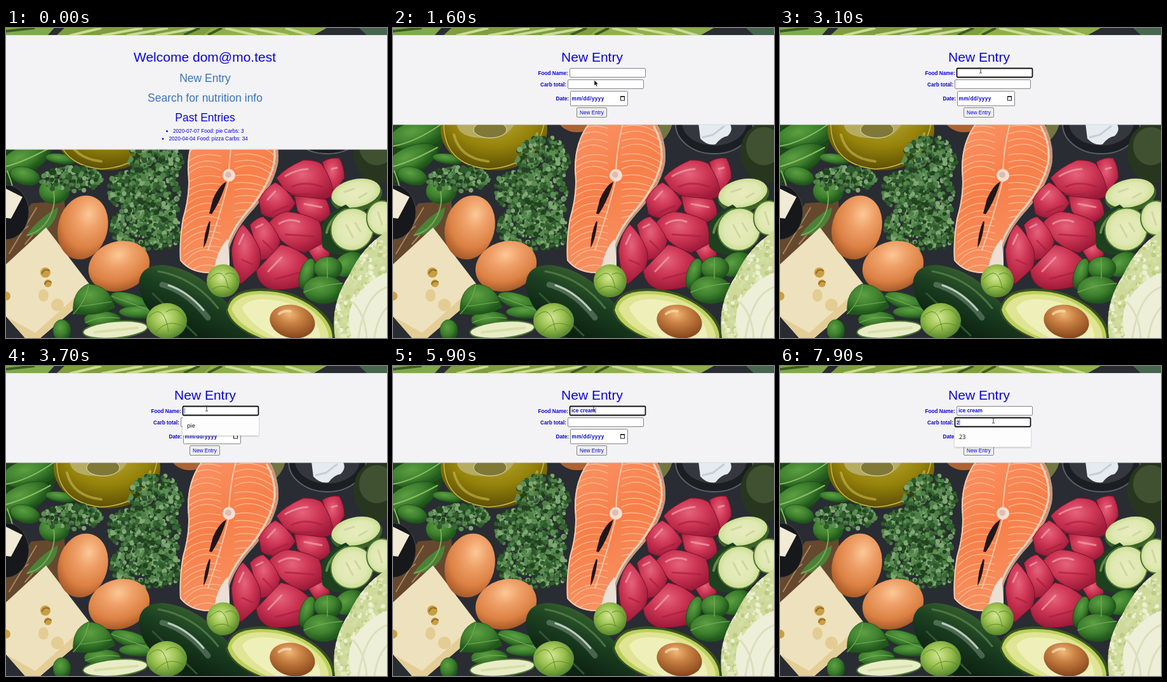
An HTML page for the animation above (8 s loop, 600x488 px).

```html
<!DOCTYPE html>
<html lang="en">
<head>
<meta charset="utf-8">
<title>Food diary</title>
<style>
html, body { margin: 0; width: 100%; height: 100%; overflow: hidden; }
svg { display: block; width: 600px; height: 488px; }
text { font: 8.2px "Liberation Sans", Arial, sans-serif; fill: #0b05d2; white-space: pre; }
.mid { text-anchor: middle; }
.h1 { font-size: 21px; }
.h2 { font-size: 17.5px; }
.link { fill: #3a74b8; }
.bold { font-weight: bold; }
.menu text { font: 500 9px "Noto Sans", sans-serif; fill: #111; }
.tip text { font: 8.6px "Noto Sans", sans-serif; fill: #fff; }
.field { fill: #fff; stroke: #858585; }
.focus { stroke: #101010; stroke-width: 1.8; }
.panel { fill: #f3f2f5; stroke: #dcdce0; }
.menu rect { fill: #fdfdfd; filter: drop-shadow(0 1px 1px #0004); }
.line { fill: none; stroke-linecap: round; }
</style>
</head>
<body>
<svg viewBox="0 0 600 488">
<defs>
  <radialGradient id="egg" cx=".55" cy=".28" r=".8"><stop stop-color="#fbc896"/><stop offset=".3" stop-color="#efa068"/><stop offset=".65" stop-color="#dc8144"/><stop offset="1" stop-color="#93481c"/></radialGradient>
  <radialGradient id="oil" cy=".3" r=".7"><stop stop-color="#c0b040"/><stop offset=".6" stop-color="#94820a"/><stop offset="1" stop-color="#5a4d06"/></radialGradient>
  <radialGradient id="leaf" cx=".4" cy=".35" r=".6"><stop stop-color="#5da043"/><stop offset=".6" stop-color="#3d7f2d"/><stop offset="1" stop-color="#20571c"/></radialGradient>
  <radialGradient id="sprout" cx=".45" cy=".4" r=".6"><stop stop-color="#d4e796"/><stop offset=".5" stop-color="#9cc250"/><stop offset="1" stop-color="#54862a"/></radialGradient>
  <radialGradient id="slice"><stop stop-color="#e9ecbf"/><stop offset=".7" stop-color="#dfe8b2"/><stop offset="1" stop-color="#cbdd92"/></radialGradient>
  <radialGradient id="pit" cx=".4" cy=".3" r=".7"><stop stop-color="#efb878"/><stop offset=".4" stop-color="#c98143"/><stop offset="1" stop-color="#89481c"/></radialGradient>
  <radialGradient id="meat" cx=".45" cy=".35" r=".65"><stop stop-color="#e5637b"/><stop offset=".5" stop-color="#cd3554"/><stop offset="1" stop-color="#9d1938"/></radialGradient>
  <linearGradient id="fish" x2=".4" y2="1"><stop stop-color="#fb9467"/><stop offset=".5" stop-color="#f77f49"/><stop offset="1" stop-color="#f89364"/></linearGradient>
  <linearGradient id="squash" x1=".3" y1=".8" x2=".7" y2=".2"><stop stop-color="#0d2312"/><stop offset=".55" stop-color="#1b3f20"/><stop offset="1" stop-color="#38622f"/></linearGradient>
  <clipPath id="cabbage"><path d="M600 320Q560 345 540 390Q510 435 518 488H600Z"/></clipPath>
  <clipPath id="steak"><path d="M308 150H416Q433 185 428 215Q420 250 390 285Q362 315 352 345L352 375Q340 385 320 386Q290 386 274 366Q272 335 278 300Q290 260 286 225Q285 180 308 150Z"/></clipPath>
</defs>

<g id="photo">
  <path d="M0 0H600V488H0Z" fill="#292c32"/>
  <!-- top edge -->
  <path d="M0 0H76L66 11H0Z" fill="#7fa94c"/>
  <path d="M92 0H322L310 11H80Z" fill="#7f9d41"/>
  <path d="M322 0H505L485 11H310Z" fill="#8fae4d"/>
  <path d="M100 12L150 0M150 12L215 0M190 12L255 0M235 12L300 0M345 0L395 12M385 0L445 12M440 0L480 12" stroke="#cadb95" stroke-width="4"/>
  <path d="M280 11L305 0M0 5L45 0M318 11L340 0" stroke="#3d5a25" stroke-width="4"/>
  <path d="M556 0H600V11H568Z" fill="#46664d"/>
  <!-- spinach, oil, third egg -->
  <path d="M0 150H95L72 195Q50 235 0 245Z" fill="#1d4519"/>
  <g fill="url(#leaf)" stroke="#1d4a18" stroke-width=".7">
    <ellipse cx="40" cy="168" rx="46" ry="22" transform="rotate(-12 40 168)"/>
    <ellipse cx="30" cy="206" rx="42" ry="20" transform="rotate(-22 30 206)"/>
    <ellipse cx="86" cy="206" rx="24" ry="8" transform="rotate(8 86 206)"/>
    <ellipse cx="30" cy="233" rx="24" ry="14" transform="rotate(15 30 233)"/>
  </g>
  <path class="line" d="M0 186Q35 180 75 152M0 218Q30 210 70 188M2 225Q8 240 12 256" stroke="#8bbb62" stroke-width="2"/>
  <ellipse cx="159" cy="160" rx="84" ry="64" fill="url(#oil)"/>
  <path class="line" d="M80 150Q80 215 150 222Q225 218 238 150" stroke="#c5b64f" stroke-width="1.5"/>
  <path class="line" d="M96 168Q105 205 150 210M205 203Q222 190 227 166" stroke="#d3c253" stroke-width="4" opacity=".55"/>
  <path d="M100 150Q102 172 140 173Q178 178 192 150Z" fill="#b5ac62"/>
  <ellipse cx="153" cy="160" rx="26" ry="13" fill="#7f7837" stroke="#dfdba9"/>
  <ellipse cx="290" cy="143" rx="30" ry="21" fill="#ad6233"/>
  <!-- bowl of salt, whole avocado -->
  <ellipse cx="506" cy="151" rx="61" ry="47" fill="#1b1e23" stroke="#5b6066" stroke-width="2"/>
  <ellipse cx="506" cy="149" rx="51" ry="36" fill="#34383e"/>
  <path d="M481 150H530Q537 160 527 170Q516 172 508 183Q495 186 484 174Z" fill="#e6ebf0"/>
  <path class="line" d="M488 172L504 168L521 155" stroke="#c5ced7" stroke-width="3"/>
  <ellipse cx="590" cy="196" rx="43" ry="48" fill="#28361f"/>
  <ellipse cx="584" cy="186" rx="28" ry="30" fill="#3f5130"/>
  <path d="M416 185Q414 165 420 150H440Q437 168 416 185Z" fill="#737641"/>
  <!-- bowl and paper at the left -->
  <path d="M0 335L40 276L92 272L100 370L0 385Z" fill="#66482e"/>
  <path class="line" d="M5 355L48 283M30 340L68 295M10 330L35 312" stroke="#a98458" stroke-width="2"/>
  <ellipse cx="0" cy="290" rx="36" ry="43" fill="#17181b" stroke="#46484c"/>
  <path d="M0 253L26 266L8 300L0 299Z" fill="#f1ead6"/>
  <path d="M31 328Q50 300 82 282Q80 310 52 324Z" fill="#4a8237"/>
  <ellipse cx="76" cy="257" rx="24" ry="20" fill="url(#leaf)"/>
  <path class="line" d="M70 242Q82 270 70 295T34 326" stroke="#7da657" stroke-width="2"/>
  <g id="kale"></g>
  <!-- salmon -->
  <g clip-path="url(#steak)">
    <path d="M265 150H440V390H265Z" fill="url(#fish)"/>
    <g id="marbling" class="line" stroke="#fdbb94" stroke-width="1.2"></g>
    <path class="line" d="M362 150Q352 190 351 228M351 238Q340 285 318 350" stroke="#fbc7a8" stroke-width="2"/>
    <path class="line" d="M416 150Q433 185 428 215Q420 250 390 285Q362 315 352 345L352 376" stroke="#b59d8d" stroke-width="6"/>
    <path class="line" d="M411 155Q427 185 422 213Q414 247 386 282Q358 312 347 345" stroke="#f5d3bd" stroke-width="3"/>
    <path class="line" d="M308 150Q285 180 286 225Q290 260 278 300Q272 335 274 366Q290 386 320 386" stroke="#efcbb1" stroke-width="4"/>
    <path d="M328 380Q332 350 349 332L353 380Z" fill="#ebdfd5"/>
  </g>
  <path d="M347 242Q336 247 326 269L320 292L324 293Q339 270 347 242ZM320 304Q312 322 311 346Q319 333 322 305Z" fill="#20171a"/>
  <circle cx="351" cy="232" r="10" fill="#f5dfd2"/>
  <circle cx="350" cy="231" r="5" fill="#dfbcae"/>
  <!-- beef -->
  <g fill="url(#meat)" stroke="#75142d" stroke-linejoin="round">
    <path d="M498 211Q510 203 525 205Q533 219 533 236L515 262Z"/>
    <path d="M426 236Q440 220 468 208Q486 207 497 214Q514 238 516 264Q498 272 478 272Q452 264 438 254Z"/>
    <path d="M398 271Q410 250 424 243Q442 252 456 276Q446 292 431 300Q411 300 402 292Z"/>
    <path d="M454 264L504 270Q512 284 510 298L492 307Q470 302 459 288Z"/>
    <path d="M476 350Q488 337 505 335L510 358L488 369Z"/>
    <path d="M413 308Q424 293 441 289Q470 291 493 304Q500 322 497 340L470 354Q449 348 434 335Z"/>
    <path d="M384 310Q395 298 405 297Q424 313 432 335L425 360L400 366Z"/>
    <path d="M355 350Q360 320 373 309Q390 325 400 350Q403 370 396 380L370 403Q358 392 355 350Z"/>
    <path d="M394 382L433 341Q458 345 478 365Q478 390 465 407Q440 413 418 412Q396 404 394 382Z"/>
  </g>
  <path class="line" d="M440 233Q460 222 475 222M412 270L424 257M470 277L497 282M430 308Q445 299 462 305M394 314L404 309M367 340L374 325M413 383L434 361M513 222L521 220" stroke="#f0a2ad" stroke-width="3" opacity=".7"/>
  <path class="line" d="M450 250Q470 240 498 250M446 262L480 262M420 290L444 280M440 325L485 328M405 335L420 350M372 365L388 372M425 395L462 385" stroke="#a51d3d" stroke-width="3" opacity=".6"/>
  <!-- courgette slices -->
  <ellipse cx="552" cy="264" rx="41" ry="25" transform="rotate(-12 552 264)" fill="#3b6327"/>
  <ellipse cx="551" cy="260" rx="39" ry="22" transform="rotate(-12 551 260)" fill="url(#slice)"/>
  <path d="M497 313Q505 291 535 278L574 310Q574 350 550 356Q510 361 498 344Z" fill="#1d401f"/>
  <path class="line" d="M505 322Q509 300 534 286" stroke="#64894b" stroke-width="4"/>
  <ellipse cx="545" cy="317" rx="34" ry="33" transform="rotate(-45 545 317)" fill="url(#slice)" stroke="#4c7430" stroke-width="2"/>
  <ellipse cx="592" cy="299" rx="24" ry="27" fill="url(#slice)" stroke="#4c7430" stroke-width="2"/>
  <path class="line" d="M533 258L548 253M556 267L568 260M536 310L546 329M550 307L558 320M586 290L592 309" stroke="#cfd89f" stroke-width="3"/>
  <!-- right spinach and cabbage -->
  <g fill="url(#leaf)" stroke="#1d4a18" stroke-width=".7">
    <ellipse cx="540" cy="372" rx="25" ry="18" transform="rotate(-30 540 372)"/>
    <ellipse cx="474" cy="387" rx="11" ry="25" transform="rotate(18 474 387)"/>
    <ellipse cx="507" cy="378" rx="22" ry="18"/>
    <ellipse cx="500" cy="412" rx="32" ry="22"/>
  </g>
  <path class="line" d="M469 416Q496 404 530 402M506 394V363" stroke="#6ea64f" stroke-width="1.5"/>
  <g clip-path="url(#cabbage)">
    <path d="M500 310H600V488H500Z" fill="#ced99b"/>
    <g id="wrinkles"></g>
    <path d="M600 385Q567 398 547 430Q534 455 545 488H600Z" fill="#eeefd9"/>
    <path class="line" d="M600 408Q565 420 555 488M600 440Q585 455 580 488M547 432Q566 453 568 488" stroke="#dbdfbb" stroke-width="3"/>
  </g>
  <!-- cheese -->
  <path d="M63 314L0 372V454L30 488H54L108 442L132 404Z" fill="#eee1bd"/>
  <path d="M0 454L30 488H54L108 442L128 407L46 480Z" fill="#e3ce97"/>
  <g fill="#ca9f43">
    <circle cx="62" cy="385" r="8"/><circle cx="66" cy="402" r="6"/><circle cx="0" cy="422" r="7"/>
    <g fill="#e3cd93"><ellipse cx="59" cy="421" rx="8" ry="10"/><circle cx="81" cy="436" r="10"/></g>
  </g>
  <path class="line" d="M57 386Q60 378 68 382M61 403Q64 396 71 400" stroke="#946924" stroke-width="2"/>
  <!-- eggs -->
  <ellipse cx="121" cy="314" rx="39" ry="51" transform="rotate(15 121 314)" fill="url(#egg)"/>
  <ellipse cx="178" cy="375" rx="49" ry="39" transform="rotate(-18 178 375)" fill="url(#egg)"/>
  <!-- bottom row -->
  <g fill="url(#leaf)" stroke="#1d4a18" stroke-width=".7">
    <ellipse cx="198" cy="431" rx="34" ry="12" transform="rotate(18 198 431)"/>
    <ellipse cx="212" cy="447" rx="34" ry="10"/>
    <ellipse cx="88" cy="476" rx="14" ry="17"/>
    <ellipse cx="152" cy="459" rx="29" ry="13"/>
    <path d="M106 450Q103 414 129 403Q163 404 172 440Q145 455 106 450Z"/>
  </g>
  <path class="line" d="M106 450Q126 430 130 405M118 438L166 431M125 464Q150 452 178 457M166 422L228 445" stroke="#78ac58" stroke-width="1.2"/>
  <path d="M209 406Q209 374 245 373Q300 377 345 430Q377 462 383 488H275Q215 450 209 406Z" fill="url(#squash)"/>
  <path class="line" d="M240 383Q296 393 334 441" stroke="#55804c" stroke-width="3" opacity=".8"/>
  <path class="line" d="M246 404Q285 414 318 456" stroke="#a9bda9" stroke-width="9" opacity=".35"/>
  <path class="line" d="M256 405Q286 415 311 444" stroke="#e3ebe4" stroke-width="3" opacity=".75"/>
  <path class="line" d="M231 418Q270 455 300 484" stroke="#2f5630" stroke-width="3"/>
  <ellipse cx="172" cy="475" rx="51" ry="13" transform="rotate(-5 172 475)" fill="#e9edc6" stroke="#47752e" stroke-width="2"/>
  <path class="line" d="M140 479L207 472" stroke="#d7dfaa" stroke-width="4"/>
  <ellipse cx="253" cy="461" rx="32" ry="28" fill="url(#sprout)"/>
  <circle cx="342" cy="398" r="26" fill="url(#sprout)"/>
  <path class="line" d="M225 455Q248 430 256 477M252 447Q270 434 283 460M235 480Q255 455 281 471M320 396Q343 370 350 410M345 388Q359 380 366 398M325 411Q342 400 359 414" stroke="#5d8a2d"/>
  <path d="M346 446Q350 411 398 410Q450 409 490 440Q520 463 517 488H395Q353 469 346 446Z" fill="#36521d"/>
  <path d="M349 444Q354 415 398 414Q450 413 488 443Q514 465 514 488H402Q356 470 349 444Z" fill="#bdcf5c"/>
  <path d="M355 442Q362 420 400 419Q449 418 483 446Q508 467 508 488H412Q364 468 355 442Z" fill="#dfe594"/>
  <path d="M372 440Q380 427 405 427Q445 428 472 447Q495 466 495 488H425Q380 464 372 440Z" fill="#eff0b9"/>
  <ellipse cx="451" cy="462" rx="36" ry="26" transform="rotate(12 451 462)" fill="url(#pit)"/>
  <path class="line" d="M430 450Q438 444 448 446" stroke="#fbe3bd" stroke-width="4" opacity=".7"/>
</g>

<g id="home">
  <path class="panel" d="M-2 11.5H602V191H-2Z"/>
  <text class="mid h1" x="313" y="53">Welcome dom@mo.test</text>
  <text class="mid h2 link" x="313.5" y="85">New Entry</text>
  <text class="mid h2 link" x="313.5" y="116">Search for nutrition info</text>
  <text class="mid h2" x="313.5" y="147">Past Entries</text>
  <text x="263" y="165">2020-07-07 Food: pie Carbs: 3</text>
  <text x="256.5" y="177">2020-04-04 Food: pizza Carbs: 34</text>
  <g fill="#0b05d2"><circle cx="253.5" cy="162.5" r="1.4"/><circle cx="247" cy="174.5" r="1.4"/></g>
</g>

<g id="form">
  <path class="panel" d="M-2 11.5H602V152H-2Z"/>
  <text class="mid h1" x="313.5" y="53">New Entry</text>
  <text class="bold" x="228.5" y="73.5">Food Name:</text>
  <text class="bold" x="232" y="91.5">Carb total:</text>
  <text class="bold" x="256.5" y="114">Date:</text>
  <rect class="field" id="foodBox" x="278.5" y="63.5" width="119" height="14" rx="1.5"/>
  <rect class="field" id="carbBox" x="275.5" y="81.5" width="119" height="14" rx="1.5"/>
  <rect class="field" x="279.5" y="99.5" width="90" height="23" rx="1"/>
  <text class="bold" x="281.5" y="114" letter-spacing=".38">mm/dd/yyyy</text>
  <path d="M358.5 107.5H364.5V114H358.5ZM358 108.3H365" fill="none" stroke="#222" stroke-width="1.1"/>
  <rect x="289.5" y="125.5" width="47" height="15" rx="1.5" fill="#efefef" stroke="#858585"/>
  <text class="mid" x="313" y="136">New Entry</text>
  <text class="bold" id="food" x="281" y="73.3"></text>
  <text class="bold" id="carb" x="278" y="91.5"></text>
  <path id="caret" d="M0 0V9" stroke="#5b5bd0" stroke-width=".9"/>
  <g class="menu" id="foodMenu"><rect x="278" y="79" width="120" height="30.5" rx="1"/><text x="285" y="97">pie</text></g>
  <g class="menu" id="carbMenu"><rect x="275" y="97" width="120" height="136" rx="1"/></g>
  <g class="menu" id="match"><rect x="275" y="97" width="120" height="30.5" rx="1"/><text x="282" y="115">23</text></g>
  <g class="tip" id="tip"><rect x="321" y="75" width="101.5" height="14" fill="#303134" style="filter:drop-shadow(1px 1px 2px #0005)"/><text x="325" y="85">Please fill out this field.</text></g>
</g>

<path id="arrow" d="M0 0V9L2.1 7.1L3.5 10.2L5 9.5L3.6 6.5H6.4Z" fill="#111" stroke="#fff" stroke-width=".5"/>
<path id="beam" d="M-2 -4H-.6L0 -3.4L.6 -4H2M0 -3.4V3.4M-2 4H-.6L0 3.4L.6 4H2" fill="none" stroke="#333"/>
</svg>

<script>
const $ = id => document.getElementById(id);
const show = (id, on) => $(id).style.display = on ? "" : "none";
const place = (id, x, y) => $(id).setAttribute("transform", `translate(${x} ${y})`);
let seed = 7;
const rand = () => (seed = seed * 16807 % 2147483647) / 2147483647;

// Fills an ellipse with small random dots.
function dots(id, count, cx, cy, rx, ry, size, colors) {
  let out = "";
  for (let i = 0; i < count; i++) {
    const a = rand() * 2 * Math.PI, d = Math.sqrt(rand());
    const x = cx + rx * d * Math.cos(a), y = cy + ry * d * Math.sin(a);
    const color = colors[Math.floor(rand() * colors.length)];
    out += `<circle cx="${x.toFixed(1)}" cy="${y.toFixed(1)}" r="${(size * (.4 + rand() * .6)).toFixed(1)}" fill="${color}"/>`;
  }
  $(id).innerHTML += out;
}
const kale = ["#21431f", "#386733", "#4f8048", "#7fa873", "#2f5a2c", "#5c8d53"];
[[104, 238, 50, 19, 220], [236, 210, 42, 40, 300], [186, 255, 25, 28, 160],
 [230, 268, 45, 42, 300], [211, 315, 45, 36, 300], [246, 318, 30, 30, 160]]
  .forEach(([x, y, rx, ry, n]) => dots("kale", n, x, y, rx, ry, 4.5, kale));
dots("wrinkles", 500, 562, 415, 55, 95, 4, ["#e2e9bd", "#bccd82", "#d3dfa5", "#edf0d2"]);

let lines = "";
for (let i = 0; i < 22; i++) {
  const y = 160 + i * 11, bend = 8 + rand() * 14;
  lines += `<path d="M280 ${y + 12}Q305 ${y - bend} 338 ${y - 2}M360 ${y - 4}Q392 ${y - bend} 425 ${y + 10}"/>`;
}
$("marbling").innerHTML = lines;
$("carbMenu").innerHTML += ["3", "23", "333", "4", "7", "6"]
  .map((s, i) => `<text x="282" y="${115 + i * 21.1}">${s}</text>`).join("");

const OPEN = 1000, FOOD = 2900, TYPE = 4400, CARB = 6500, DIGIT = 7600, KEY = 150;
const moves = [[300, 345, 150], [800, 317, 82], [1900, 317, 82], [2100, 316, 67],
  [6100, 316, 67], [6400, 336, 86], [8000, 336, 86]];

function pointer(t) {
  const i = Math.max(1, moves.findIndex(m => m[0] > t));
  const [t0, x0, y0] = moves[i - 1], [t1, x1, y1] = moves[i];
  const p = Math.min(1, Math.max(0, (t - t0) / (t1 - t0))), e = p * p * (3 - 2 * p);
  return [x0 + (x1 - x0) * e, y0 + (y1 - y0) * e];
}

function frame() {
  const t = performance.now() % 8000;
  const between = (a, b) => t >= a && t < b;
  show("home", t < OPEN);
  show("form", t >= OPEN);

  const typed = Math.max(0, Math.floor((t - TYPE) / KEY) + 1);
  $("food").textContent = "ice cream".slice(0, typed);
  $("carb").textContent = t >= DIGIT ? "2" : "";
  $("foodBox").classList.toggle("focus", between(FOOD, CARB));
  $("carbBox").classList.toggle("focus", t >= CARB);

  show("tip", between(2300, 2800));
  show("foodMenu", between(3300, TYPE));
  show("carbMenu", between(6700, DIGIT));
  show("match", t >= DIGIT);

  const lastInput = t >= DIGIT ? DIGIT : t >= CARB ? CARB
    : t >= TYPE ? Math.min(t, TYPE + 8 * KEY) : FOOD - 300;
  show("caret", t >= FOOD && (t - lastInput) % 1000 < 500);
  const active = t >= CARB ? "carb" : "food";
  const width = $(active).textContent ? $(active).getComputedTextLength() : 0;
  place("caret", (active === "carb" ? 278 : 281) + width + .4, active === "carb" ? 84 : 66);

  const [x, y] = pointer(t);
  show("arrow", between(300, 2000));
  show("beam", t >= 2000);
  place("arrow", x, y);
  place("beam", x, y);
  requestAnimationFrame(frame);
}
frame();
</script>
</body>
</html>
```
